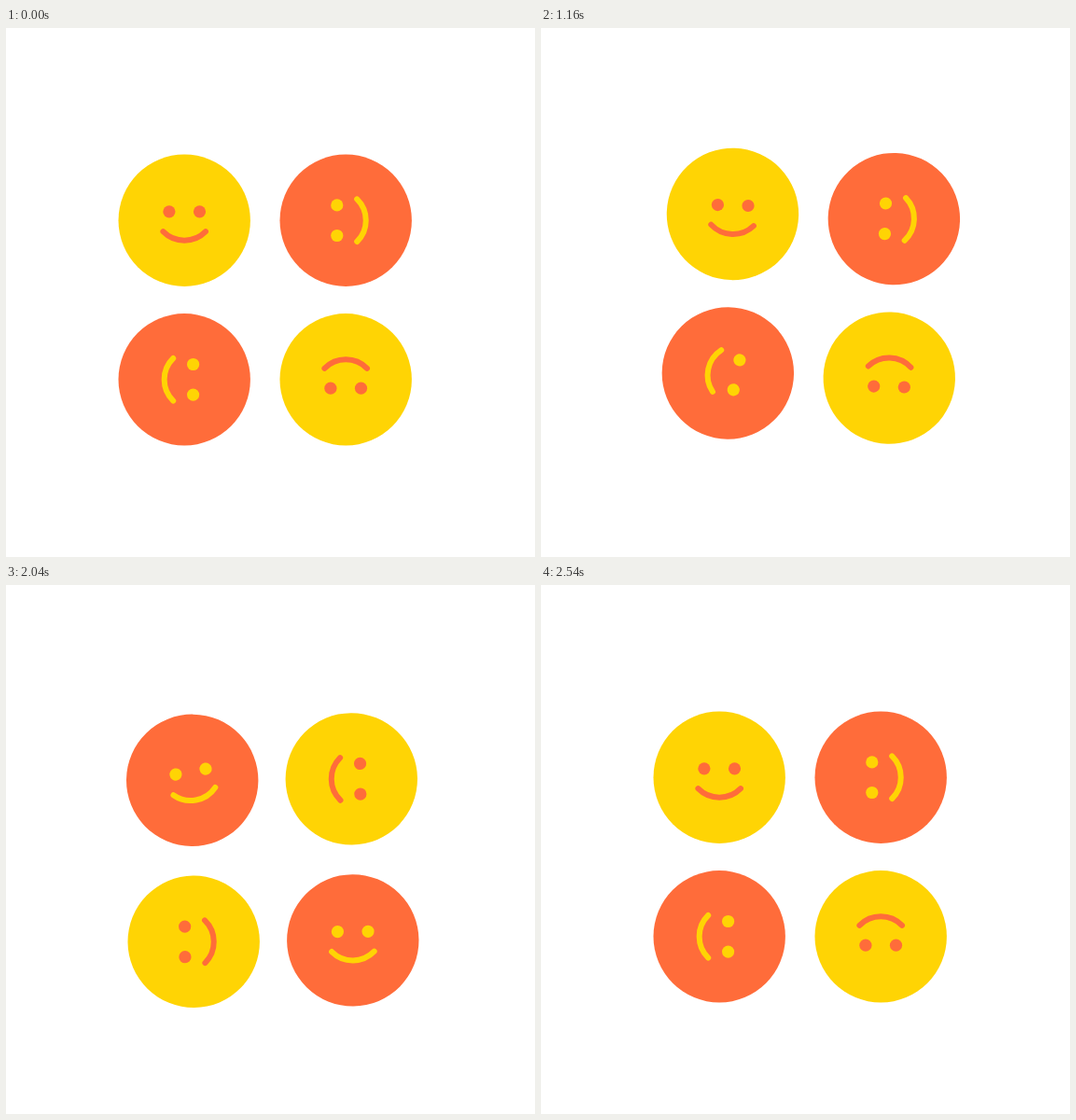
An HTML page that plays this animation: 567x567 px, repeating every 3.22 s.

```html
<!DOCTYPE html>
<html lang="en">
<head>
<meta charset="utf-8">
<title>Spinning smileys</title>
<style>
  html, body { margin: 0; width: 100%; height: 100%; overflow: hidden; background: #fff; }
  svg { display: block; width: 100%; height: 100%; }
  .yellow { --skin: #ffd404; --ink: #ff6c3a; }
  .orange { --skin: #ff6c3a; --ink: #ffd404; }
  .skin { fill: var(--skin); }
  .eye { fill: var(--ink); }
  .mouth { fill: none; stroke: var(--ink); stroke-width: 6; stroke-linecap: round; }
</style>
</head>
<body>
<svg viewBox="0 0 567 567">
  <defs>
    <g id="smiley">
      <circle class="skin" r="70.7"/>
      <circle class="eye" cx="-16.3" cy="-9.4" r="6.6"/>
      <circle class="eye" cx="16.3" cy="-9.4" r="6.6"/>
      <path class="mouth" d="M-22.8 12A32 32 0 0 0 22.8 12"/>
    </g>
  </defs>
  <g transform="translate(283.5 289.3)">
    <g id="ring">
      <use href="#smiley" class="yellow" transform="translate(-92.3 -83.1)"/>
      <use href="#smiley" class="orange" transform="translate(-92.3 87.5) rotate(90)"/>
      <use href="#smiley" class="yellow" transform="translate(80.7 87.5) rotate(180)"/>
      <g transform="translate(80.7 -83.1) rotate(-90)">
        <use href="#smiley" class="orange" id="roller"/>
      </g>
    </g>
  </g>
</svg>
<script>
  const LOOP = 3220, STEP = 20;

  // Each move: start and end in ms, angles in degrees, x handles of the ease curve.
  const spins = [
    { start: 20, end: 500, from: 0, to: -180, ease: [0.53, 0.735] },
    { start: 1140, end: 1500, from: -180, to: 270, ease: [0.53, 0.597] },
    { start: 2020, end: 2540, from: 270, to: 0, ease: [0.53, 0.366] }
  ];
  const rolls = [
    { start: 1140, end: 1500, from: 0, to: 180 },
    { start: 2020, end: 2380, from: 180, to: 0 }
  ];

  const ring = document.getElementById('ring');
  const roller = document.getElementById('roller');

  // Cubic bezier (x1, 0, x2, 1), solved by bisection.
  function bezier(x, [x1, x2]) {
    let lo = 0, hi = 1;
    for (let i = 0; i < 30; i++) {
      const s = (lo + hi) / 2, r = 1 - s;
      const bx = 3 * r * r * s * x1 + 3 * r * s * s * x2 + s * s * s;
      if (bx < x) lo = s; else hi = s;
    }
    return lo * lo * (3 - 2 * lo);
  }

  function angleAt(moves, t) {
    let angle = 0;
    for (const m of moves) {
      if (t < m.start) break;
      if (t >= m.end) { angle = m.to; continue; }
      const x = (t - m.start) / (m.end - m.start);
      angle = m.from + (m.to - m.from) * (m.ease ? bezier(x, m.ease) : x);
    }
    return angle;
  }

  const began = performance.now();

  function draw() {
    // Poses advance at 50 per second; the small bias absorbs timer jitter.
    const elapsed = performance.now() - began + 2;
    const t = Math.floor(elapsed / STEP) * STEP % LOOP;
    ring.setAttribute('transform', `rotate(${angleAt(spins, t)})`);
    roller.setAttribute('transform', `rotate(${angleAt(rolls, t)})`);
    requestAnimationFrame(draw);
  }
  draw();
</script>
</body>
</html>
```
